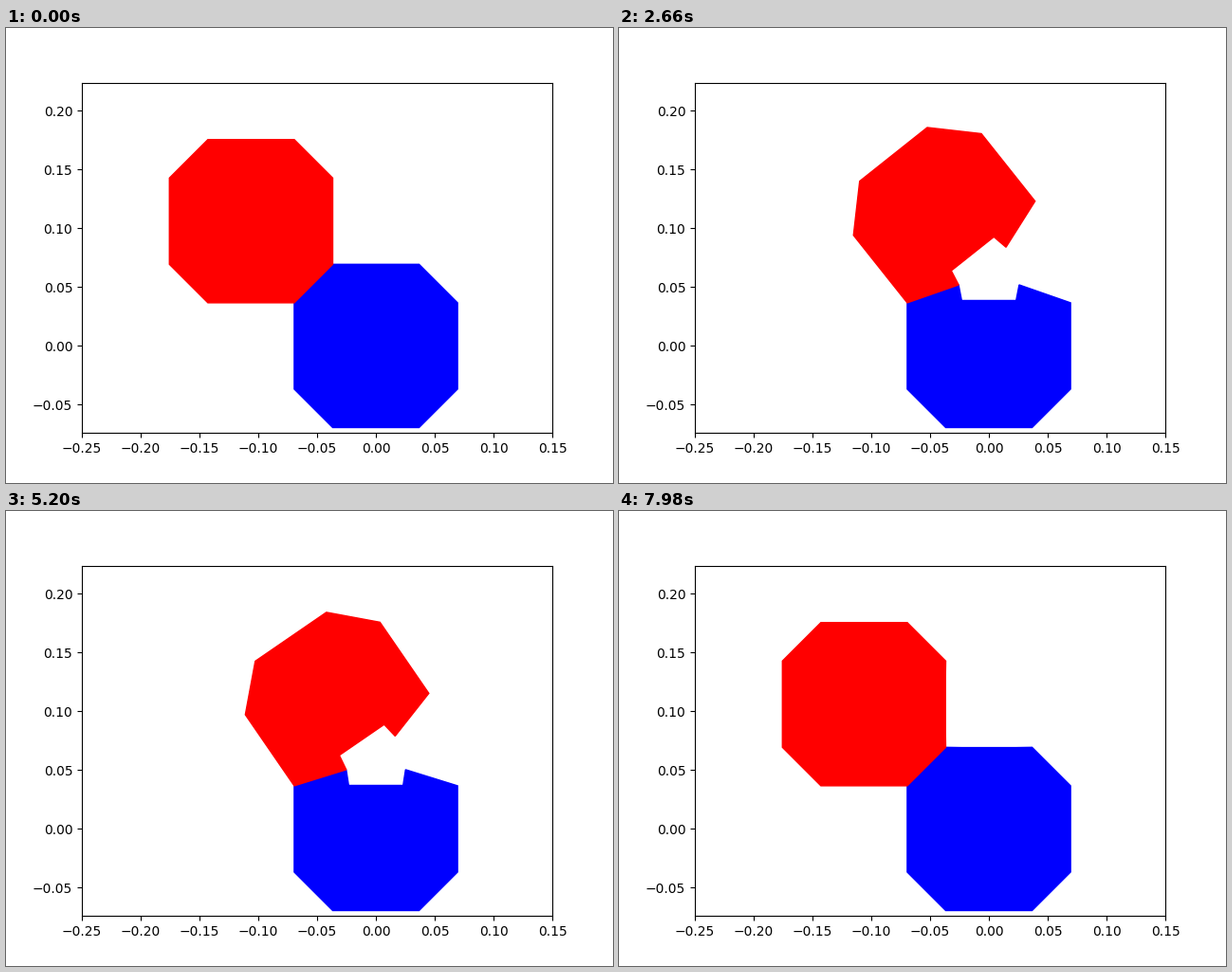
Write a matplotlib script that moves like this. It is 640x480 px and loops after 8000 ms.

```python
import numpy as np
import matplotlib.pyplot as plt
from matplotlib.animation import FuncAnimation
from matplotlib.patches import Polygon

FRAMES = 400
A = np.sqrt(0.015 / 7)       # grid unit, also the slanted side
W = 1.5 * A                  # half width of the octagon
M = 0.5 * A                  # half width of the sliding plate
H = W - A / np.sqrt(2)       # half length of a straight side
B = H - M                    # small flap beside the plate


def hinge_angle(q):
    """Angle of the slanted side when the plate is at height q."""
    dy = q - H
    d = np.hypot(A, dy)
    return np.arctan2(dy, A) + np.arccos((A**2 + d**2 - B**2) / (2 * A * d))


def shapes(u):
    """Folded octagon and its mirror image across the shared side."""
    q = W - A * u
    t = hinge_angle(q)
    px, py = -W + A * np.cos(t), H + A * np.sin(t)
    left = [(-H, -W), (-W, -H), (-W, H), (px, py), (-M, q)]
    base = np.array(left + [(-x, y) for x, y in left[::-1]])
    c, s = np.cos(2 * t), np.sin(2 * t)
    pivot = np.array([-W, H])
    mirror = (base - pivot) @ np.array([[c, s], [s, -c]]) + pivot
    return base, mirror


fig, ax = plt.subplots(figsize=(6.4, 4.8), dpi=100)
half = 0.2 * 369.6 / 496     # keeps the scale equal on both axes
ax.set_xlim(-0.25, 0.15)
ax.set_ylim(0.075 - half, 0.075 + half)

patches = [ax.add_patch(Polygon(xy, closed=True, color=color, lw=1))
           for xy, color in zip(shapes(0), ("blue", "red"))]


def update(i):
    u = 1 - abs(1 - 2 * i / FRAMES)
    for patch, xy in zip(patches, shapes(u)):
        patch.set_xy(xy)
    return patches


anim = FuncAnimation(fig, update, frames=FRAMES, interval=20,
                     repeat=True, repeat_delay=0, blit=False)
plt.show()
```
